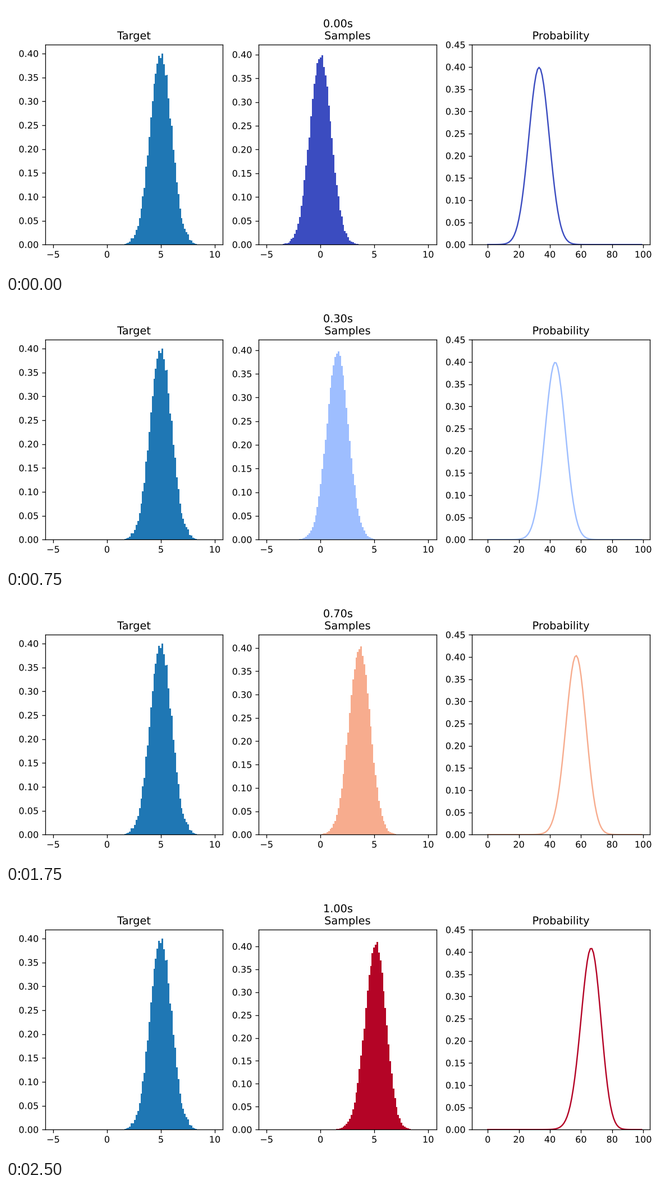
Write a matplotlib script that moves like this. It is 1174 by 477 pixels and loops after 2750 ms.

```python
import numpy as np
import matplotlib.pyplot as plt
from matplotlib.animation import FuncAnimation
from matplotlib.patheffects import Normal
from matplotlib.text import Text

W, H, DPI = 1174, 477, 115.8
LEFT, BOTTOM, WIDTH, HEIGHT, PITCH = 69.6, 50.8, 316.8, 357, 380.2
STEPS = 10

plt.rcParams["font.family"] = "DejaVu Sans"

edges = np.linspace(-5, 10, 101)
step = edges[1] - edges[0]
centers = edges[:-1] + step / 2
grid = np.linspace(-5, 10, 100)
cmap = plt.get_cmap("coolwarm")


def gauss(z):
    return np.exp(-z**2 / 2) / np.sqrt(2 * np.pi)


def noisy_bell(mean, noise, seed):
    """Histogram heights of a normal sample, with sampling noise."""
    rng = np.random.default_rng(seed)
    bell = gauss(centers - mean)
    bell = bell + noise * np.sqrt(bell) * rng.standard_normal(len(bell))
    return np.clip(bell, 0, 0.3995)


target = noisy_bell(5, 0.014, 4)
start = noisy_bell(0, 0.009, 7)
mass = np.concatenate([[0], np.cumsum(start * step)])


def shape(t):
    """Centre, scale and skew of the flow at time t."""
    return 5.33 * t - 0.25 * t**2, 1 + 0.005 * t - 0.028 * t**2, 0.02 * t**2


def sample_heights(t):
    """Carry the starting histogram along the flow and bin it again."""
    mid, scale, skew = shape(t)
    moved = mid + 0.02 * t + scale * edges - skew * edges**2
    return np.diff(np.interp(edges, moved, mass)) / step


def sample_top(t):
    return 1.05 * (0.4005 + 0.015 * t**2)


def density(t):
    mid, scale, skew = shape(t)
    u = grid - mid + 2 * skew
    slope = np.sqrt(scale**2 - 4 * skew * u)
    return gauss(2 * u / (scale + slope)) / slope


fig = plt.figure(figsize=((W + 0.001) / DPI, (H + 0.001) / DPI), dpi=DPI,
                 facecolor="white")


def panel(i, title, xlim, xticks, top, last):
    ax = fig.add_axes([(LEFT + PITCH * i) / W, BOTTOM / H,
                       WIDTH / W, HEIGHT / H])
    ax.set_title(title)
    ax.set_xlim(xlim)
    ax.set_xticks(xticks)
    ax.set_ylim(0, top)
    ax.set_yticks(np.arange(0, last + 0.01, 0.05))
    ax.yaxis.set_major_formatter("{x:.2f}")
    return ax


def bars(ax, heights, color):
    return ax.bar(edges[:-1], heights, width=step, align="edge", color=color)


span, marks = (-5.75, 10.75), [-5, 0, 5, 10]
left = panel(0, "Target", span, marks, 0.4184, 0.40)
middle = panel(1, "Samples", span, marks, sample_top(0), 0.40)
right = panel(2, "Probability", (-10.2, 104.2), range(0, 101, 20), 0.45, 0.45)

bars(left, target, "#1f77b4")
samples = bars(middle, start, cmap(0.0))
curve, = right.plot(np.arange(100), density(0), color=cmap(0.0), lw=1.5)
clock = fig.text(591.4 / W, 1 - 23 / H, "0.00s", fontsize=12,
                 ha="center", va="top")

# Outlined text keeps its exact place between pixels
for text in fig.findobj(Text):
    text.set_path_effects([Normal()])


def draw(i):
    t = i / STEPS
    color = cmap(t)
    for bar, height in zip(samples, sample_heights(t)):
        bar.set_height(height)
        bar.set_facecolor(color)
    middle.set_ylim(0, sample_top(t))
    curve.set_ydata(density(t))
    curve.set_color(color)
    clock.set_text(f"{t:.2f}s")
    return [*samples, curve, clock]


anim = FuncAnimation(fig, draw, frames=STEPS + 1, interval=250,
                     init_func=lambda: draw(0), repeat=True, repeat_delay=0)
plt.show()
```
